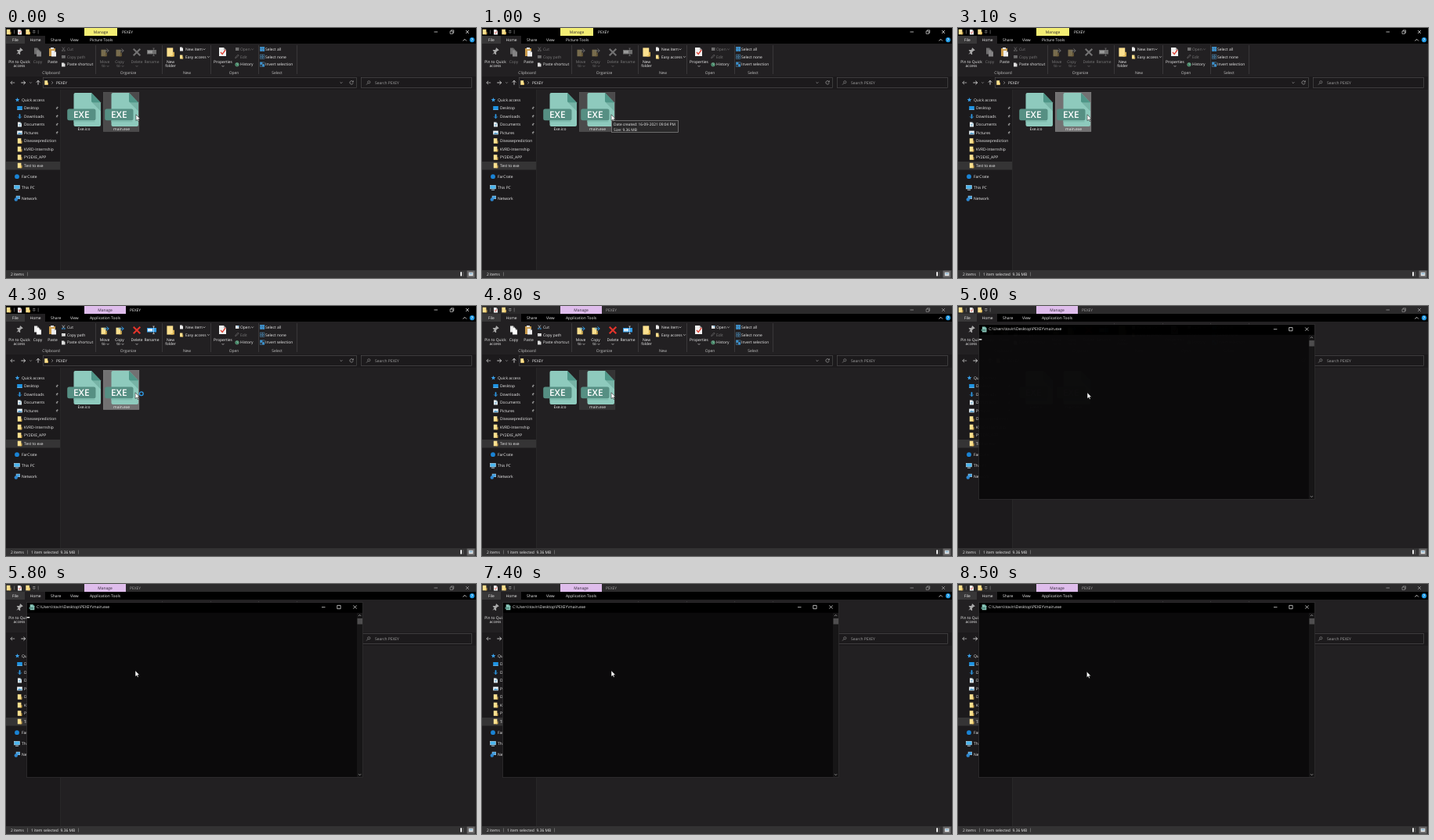
An HTML page that plays this animation: 600 by 320 pixels, repeating every 9000 ms.

```html
<!DOCTYPE html>
<html lang="en">
<head>
<meta charset="utf-8">
<title>File window and console</title>
<style>
html, body { margin: 0; width: 100%; height: 100%; overflow: hidden; background: #000; }
svg { display: block; width: 600px; height: 320px; }
text { font-family: "Open Sans", "Noto Sans", sans-serif; white-space: pre; text-rendering: geometricPrecision; }
</style>
</head>
<body>
<svg id="stage" viewBox="0 0 600 320" xmlns="http://www.w3.org/2000/svg"></svg>
<script>
const LOOP = 9000, STEP = 100;
const WHITE = '#f2f2f2', DIM = '#7b7a7b', BG = '#222022', SIDE = '#1c1a1c', BLUE = '#2f9be8';

// Drawing helpers, each returns markup
const rect = (x, y, w, h, fill, more = '') =>
  `<rect x="${x}" y="${y}" width="${w}" height="${h}" fill="${fill}" ${more}/>`;
const line = (d, color = WHITE, w = .7, fill = 'none') =>
  `<path d="${d}" stroke="${color}" stroke-width="${w}" fill="${fill}"/>`;
const shape = (d, fill) => `<path d="${d}" fill="${fill}"/>`;
const dot = (x, y, r, fill, more = '') => `<circle cx="${x}" cy="${y}" r="${r}" fill="${fill}" ${more}/>`;
const text = (x, y, s, fill = WHITE, anchor = 'start', size = 4.95, more = '') =>
  `<text x="${x}" y="${y}" fill="${fill}" text-anchor="${anchor}" font-size="${size}" ${more}>${s}</text>`;
const mid = (x, y, s, fill) => text(x, y, s, fill, 'middle');
const group = (id, body) => `<g id="${id}">${body}</g>`;
const at = (x, y, body, more = '') => `<g transform="translate(${x} ${y}) ${more}">${body}</g>`;

const caret = (x, y, c = WHITE) => line(`M${x - 1.4} ${y - .7}l1.4 1.4 1.4-1.4`, c, .6);
const bar = (x, y, h, c = '#8a8a8a') => rect(x, y, .6, h, c);
const folder = (x, y, k = 1) => at(x, y,
  rect(-2.7, -3.3, 4.6, 6.6, '#fbe08f') + shape('M1.9-.2h1v3.500h-2.600v-.8h1.600z', '#e9bd55'), `scale(${k})`);
const sheet = (x, y, w, h, c, fold = '#555') =>
  shape(`M${x} ${y}h${w * .65}l${w * .35} ${w * .35}v${h - w * .35}h${-w}z`, c) +
  shape(`M${x + w * .65} ${y}v${w * .35}h${w * .35}z`, fold);
const tack = (x, y, c, k = 1) => at(x, y,
  shape('M-1.5-3h3v.7l-.5.4v2l1.2 1.1v.7H.4L0 3.6-.4.9h-1.8V.2L-1 -.9v-1l-.5-.4z', c), `rotate(42) scale(${k})`);
const cross = (x, y, r, c, w) => line(`M${x - r} ${y - r}l${2 * r} ${2 * r}m0 ${-2 * r}l${-2 * r} ${2 * r}`, c, w);
const arrow = (x, y, angle, c, k = 1) =>
  at(x, y, line('M-2.7 0H2.7M.4-2.2L2.7 0 .4 2.2', c, .8), `rotate(${angle}) scale(${k})`);

function exeIcon(x, y) {
  return at(x, y,
    shape('M10.5 0H31L43 12.5V41q0 2-2 2H10.5q-2 0-2-2V2q0-2 2-2z', '#8ecabd') +
    shape('M32 12.5H43V23.5z', '#77b3a6') +
    shape('M31 0L43 12.5H33q-2 0-2-2z', '#4f9688') +
    shape('M8.5 35.5h27v2h-27z', '#7fbcae') +
    rect(.2, 20.5, 36.3, 14.8, '#568f83', 'rx="2.5"') +
    text(18.3, 32.2, 'EXE', '#fff', 'middle', 11.8, 'font-weight="600"'));
}

function titleBar() {
  return rect(0, 0, 600, 20, '#000') + rect(0, 0, 600, 10, '#000', 'id="titleBg"') +
    folder(3.5, 5) + bar(10, 2.5, 5) +
    sheet(15, 2, 5, 6.5, '#f0f0f0', '#999') + line('M16 5.5l1.2 1.3 2-2.6', '#e0362b', .8) +
    folder(28, 5) + line('M34.3 3.7h3', WHITE, .6) + caret(35.8, 5.8) + bar(40.8, 2.5, 5) +
    rect(0, 10, 24, 10.5, '#383738') + rect(24, 10, 26, 10.5, BG) +
    text(8, 17.2, 'File') + text(30.5, 17.2, 'Home') + text(57, 17.2, 'Share') + text(82, 17.2, 'View') +
    line('M583.5 16.5l2.2-2.2 2.2 2.2', WHITE, .8) + dot(595, 15.2, 3.1, '#1b95e0') +
    text(595, 17, '?', '#fff', 'middle', 5, 'font-weight="700"');
}

const tab = (w, color, label) => rect(100, 0, w, 10, color) +
  mid(100 + w / 2, 6.5, 'Manage', '#2a2330') + text(107, 17.2, label);

const controls = c => line('M546.5 5h4.5', c, .7) +
  line('M567 4h3.4v3.4h-3.4zM568.2 4V2.8h3.4v3.4h-1.2', c, .6) + cross(589, 5, 2, c, .7);

const caption = (x, c) => text(x, 7, 'PEXEY', c) + controls(c);

function ribbon() {
  const seps = [114, 199, 261, 322, 371].map(x => rect(x, 22, .6, 37, '#4a494a')).join('');
  const labels = [[57.5, 'Clipboard'], [156, 'Organize'], [231, 'New'], [291, 'Open'], [346, 'Select']]
    .map(([x, s]) => mid(x, 58.7, s, '#c4c4c4')).join('');
  const picks = ['Select all', 'Select none', 'Invert selection'].map((s, i) => {
    const y = 27 + i * 9.8;
    let cells = '';
    for (let k = 0; k < 4; k++) {
      const lit = i === 0 || (i === 2 && k % 3 === 0);
      cells += rect(324.5 + k % 2 * 3, y - 2.7 + (k >> 1) * 3, 2.4, 2.4, lit ? '#2f8fd6' : BG,
        'stroke="#5aaee6" stroke-width=".4"');
    }
    return cells + text(331, y + 1.7, s);
  }).join('');
  return rect(0, 20, 600, 42, BG) + seps + labels + picks +
    tack(17, 30, '#a9a9a9', 1.5) + mid(17, 44.5, 'Pin to Quick') + mid(17, 49.8, 'access') +
    rect(55, 26, 8, 10, '#c99a4a') + rect(57, 25, 4, 2.2, '#ddd') + sheet(58, 29, 6, 7.5, '#eee', '#999') +
    mid(59.5, 44.7, 'Paste') +
    sheet(71, 44.5, 4.5, 5, '#ddd', '#888') + text(78, 48.4, 'Paste shortcut') +
    folder(210, 31, 1.7) + mid(210, 44.7, 'New') + mid(210, 50, 'folder') +
    sheet(222, 24.5, 4, 5, '#eee', '#888') + text(229, 28.7, 'New item') + caret(253, 27.2) +
    folder(224, 37, .75) + text(229, 38.5, 'Easy access') + caret(258.5, 37) +
    sheet(272, 25, 9, 11, '#f0f0f0', '#aaa') + line('M274 31l2.2 2.5 4-5.5', '#df4034', 1.3) +
    mid(277, 44.7, 'Properties') + caret(277, 48.8) +
    line('M292.7 38.5l.5-1.4 3-3 1 1-3 3z', DIM, .6) + text(299, 38.5, 'Edit', DIM) +
    dot(295, 46.8, 2.3, '#2d7a57', 'stroke="#9cd6b4" stroke-width=".5"') +
    line('M295 45.3v1.6h1.3', '#fff', .5) + text(299, 48.4, 'History');
}

// Buttons that depend on a selected file
function tools(on) {
  const c = on ? WHITE : DIM, blue = on ? BLUE : '#6d6d6d', page = on ? '#e9e9e9' : '#6f6e6f';
  const send = (x, s) => folder(x - 1, 32, 1.3) + (on ? '' : rect(x - 5.5, 26, 11, 11, BG, 'opacity=".6"')) +
    arrow(x + 2, 29, 0, blue, 1.2) + mid(x, 44.7, s, c) + mid(x - 1.5, 50, 'to', c) + caret(x + 4, 48.8, c);
  return sheet(36, 25.5, 6, 8, page) + sheet(39, 28.5, 6, 8, on ? '#fff' : '#858485') + mid(40.5, 44.7, 'Copy', c) +
    line('M71.7 24.5l2.7 4M75 24.5l-2.7 4', on ? '#ddd' : DIM, .6) +
    dot(72, 29, .8, 'none', `stroke="${blue}" stroke-width=".6"`) +
    dot(74.7, 29, .8, 'none', `stroke="${blue}" stroke-width=".6"`) + text(78, 28.7, 'Cut', c) +
    rect(71, 35, 4.8, 3.7, page) + line('M71.8 37.5l1-1.6', '#444', .5) + text(78, 38.5, 'Copy path', c) +
    send(126, 'Move') + send(145, 'Copy') +
    cross(167, 31, 4.3, on ? '#e3342b' : '#737273', 2.1) + mid(167, 44.7, 'Delete', c) + caret(167, 48.8, c) +
    rect(180, 28, 12, 5.5, blue) + rect(181, 29, 6, 3.5, on ? '#d9edfb' : '#999') +
    line('M188.5 26v9.5m-1.3-9.5h2.6m-2.6 9.5h2.6', c, .6) + mid(186, 44.7, 'Rename', c) +
    rect(293, 25, 4.4, 4, page) + arrow(296, 26.5, -45, blue, .5) + text(299, 28.7, 'Open', c) + caret(314.5, 27.2, c);
}

function addressRow() {
  const box = (x, w) => rect(x, 63.4, w, 13, SIDE, 'stroke="#535253" stroke-width=".6"');
  return rect(0, 62, 600, 17, SIDE) + box(47.3, 400) + box(453.3, 141) +
    arrow(8.5, 70, 180, '#b8b8b8') + arrow(22, 70, 0, WHITE) + caret(31.5, 70, '#aaa') + arrow(41, 70, -90, WHITE) +
    folder(51.5, 70, .85) + line('M58.3 68.3l1.5 1.7-1.5 1.7', '#bbb', .6) + text(64, 71.8, 'PEXEY') +
    caret(428, 70, '#bbb') + line('M443 68.7a2.2 2.2 0 1 0 .2 1.8M443.3 67.3v1.8h-1.8', '#bbb', .6) +
    dot(463.3, 69.3, 1.6, 'none', 'stroke="#9a9a9a" stroke-width=".6"') + line('M462.1 70.5l-2 2', '#9a9a9a', .7) +
    text(471, 71.8, 'Search PEXEY', '#a3a3a3');
}

function sidebar() {
  const x = 17.5;
  const icons = [
    y => rect(x - 3.3, y - 2.5, 6.6, 4.7, '#1d93e3') + rect(x - 3.3, y + 1.4, 6.6, .8, '#7cc6f5'),
    y => arrow(x, y, 90, BLUE, 1.05) + line(`M${x} ${y - 2.5}v4`, BLUE, 1.8),
    y => sheet(x - 2.5, y - 3, 5, 6, '#e6eef2', '#79a') + line(`M${x - 1.3} ${y}h2.6m-2.6 1.3h2.6`, '#3a8cc0', .5),
    y => rect(x - 3.3, y - 2.4, 6.6, 4.8, '#eaf4fa') + shape(`M${x - 2.7} ${y + 1.8}l2-2.2 1.5 1.2 1-1 1.2 2z`, '#3b8fc4')
  ];
  const names = ['Desktop', 'Downloads', 'Documents', 'Pictures',
    'Diseaseprediction', 'KVRD-Internship', 'PY2EXE_APP', 'Test to exe'];
  const rows = names.map((s, i) => {
    const y = 102.5 + i * 10.5;
    return (icons[i] ? icons[i](y) + tack(65, y, '#9c9c9c', .62) : folder(x, y)) + text(23, y + 1.75, s);
  }).join('');
  const star = Array.from({ length: 10 }, (_, i) => {
    const r = i % 2 ? 1.3 : 3, a = i * Math.PI / 5;
    return `${(14.5 + r * Math.sin(a)).toFixed(2)},${(92 - r * Math.cos(a)).toFixed(2)}`;
  }).join(' ');
  return rect(0, 79, 69, 231, SIDE) + rect(69, 79, .6, 231, '#2e2d2e') + rect(0, 171, 69, 10.5, '#353435') +
    `<polygon points="${star}" fill="#3aa0ea"/>` + text(20, 93.7, 'Quick access') + rows +
    dot(14, 190.2, 2.9, '#1a83d4') + text(20, 192, 'FarCrate') +
    rect(10.5, 201.3, 7, 4.6, '#48b4ee', 'stroke="#cfeafa" stroke-width=".5"') + rect(12, 206.8, 4, .8, '#cfeafa') +
    text(20, 206, 'This PC') +
    rect(13, 215, 4.8, 3.8, '#3f9fe0', 'stroke="#cfe6f7" stroke-width=".4"') + dot(12.8, 219.5, 2.2, '#2d86cf') +
    text(20, 220, 'Network');
}

function statusBar() {
  return rect(0, 310, 600, 10, '#333233') + text(6, 316.9, '2 items') + bar(27.3, 312.5, 5) +
    rect(580, 312.3, 2, 5.2, '#e8e8e8') + line('M583 313h1.3m-1.3 2h1.3m-1.3 2h1.3', '#999', .6) +
    rect(588.5, 310.5, 10, 9, '#686768') + rect(590.8, 312.8, 5.5, 4.4, '#e8e8e8') + rect(591.6, 313.6, 3.9, 1.8, '#8ab4d0');
}

function consoleBox() {
  return rect(26.5, 23.5, 429, 224, '#0b0a0b', 'stroke="#343334" stroke-width=".7"') +
    rect(27, 24, 428, 12.8, '#000') +
    sheet(30.7, 26.3, 5.6, 7, '#8ecabd', '#4f9688') + rect(29.5, 29.6, 5.6, 2.3, '#568f83') +
    text(39, 31.4, 'C:\\Users\\tovin\\Desktop\\PEXEY\\main.exe', WHITE, 'start', 5) +
    line('M403 29.7h4.5', WHITE, .7) + line('M422.8 27.4h4.3v4.3h-4.3z', WHITE, .7) + cross(445.5, 29.5, 2.1, WHITE, .7) +
    rect(448, 37, 7, 210, '#171617') + rect(448.5, 44, 6.5, 7.5, '#4f4e4f') +
    line('M450 41l1.6-1.6 1.6 1.6M450 243.2l1.6 1.6 1.6-1.6', '#b0b0b0', .7);
}

const stage = document.getElementById('stage');
stage.innerHTML =
  rect(0, 0, 600, 320, BG) + titleBar() +
  group('picTab', tab(42, '#f4ee74', 'Picture Tools')) + group('appTab', tab(53, '#dfbdec', 'Application Tools')) +
  group('capLeft', caption(148, WHITE)) + group('capRight', caption(158, WHITE)) + group('capIdle', caption(158, '#a3a2a3')) +
  ribbon() + group('toolsOff', tools(false)) + group('toolsOn', tools(true)) +
  addressRow() + sidebar() +
  rect(124.3, 82.3, 45.5, 50, '#4b4a4b', 'id="tile" stroke-width=".6"') +
  exeIcon(78, 83) + exeIcon(126, 83) + mid(99.5, 130.6, 'Exe.ico') + mid(147.5, 130.6, 'main.exe') +
  statusBar() + group('picked', text(32, 316.9, '1 item selected') + text(69.5, 316.9, '9.36 MB') + bar(92.3, 312.5, 5)) +
  group('tip', rect(165.4, 118.4, 85, 15.2, '#2a292a', 'stroke="#8b8a8b" stroke-width=".7"') +
    text(168, 124.9, 'Date created: 16-09-2021 09:04 PM', WHITE, 'start', 4.85) +
    text(168, 131.5, 'Size: 9.36 MB', WHITE, 'start', 4.85)) +
  group('console', consoleBox() + rect(26.5, 42, 3.7, 1.5, '#e6e6e6', 'id="caretBar"')) +
  group('pointer', line('M0 0V7.8L1.8 6.2 3 8.8 4.2 8.3 3.1 5.7H5.5z', '#000', .5, '#fff') +
    dot(7.8, 1.5, 2.4, 'none', 'id="ring" stroke="#2f9be8" stroke-width="1.3"'));

const el = {};
stage.querySelectorAll('[id]').forEach(n => el[n.id] = n);
const show = (id, on) => el[id].setAttribute('display', on ? 'inline' : 'none');

function pointerAt(t) {
  if (t < 800) return [165.9, 110.8];
  if (t < 7600) return [165, 110.8];
  if (t < 7800) return [164.7, 111];
  if (t < 8200) return [164.5, 111.5];
  return [164.3, 112];
}

function tileColor(t) {
  if (t < 3100) return ['#4b4a4b', '#5c5b5c'];
  if (t < 4800) return ['#727172', '#8d8c8d'];
  return ['#343334', '#3d3c3d'];
}

function draw(t) {
  const idle = t >= 4800, app = t >= 3200;
  el.titleBg.setAttribute('fill', idle ? '#2b2a2b' : '#000');
  show('picTab', !app);
  show('appTab', app);
  show('capLeft', !app);
  show('capRight', app && !idle);
  show('capIdle', idle);
  show('toolsOff', !app);
  show('toolsOn', app);
  show('picked', t >= 3100);

  const [fill, edge] = tileColor(t);
  el.tile.setAttribute('fill', fill);
  el.tile.setAttribute('stroke', edge);

  show('tip', t >= 800 && t < 3100);
  el.tip.setAttribute('opacity', Math.min(1, (t - 700) / 300));

  // Console eases open around its own centre
  const left = Math.pow(1 - Math.min(1, Math.max(0, (t - 4800) / 300)), 4);
  show('console', t > 4800);
  el.console.setAttribute('opacity', Math.max(0, 1 - left * 1.2));
  el.console.setAttribute('transform', `translate(240.5 135.5) scale(${1 - left * .07}) translate(-240.5 -135.5)`);
  show('caretBar', Math.floor((t - 4740) / 530) % 2 === 0);

  show('ring', t >= 4300 && t < 4800);
  el.pointer.setAttribute('transform', `translate(${pointerAt(t)})`);
}

const start = performance.now();
function tick() {
  const t = (performance.now() - start) % LOOP;
  draw(Math.floor(t / STEP) * STEP);
  requestAnimationFrame(tick);
}
tick();
</script>
</body>
</html>
```
